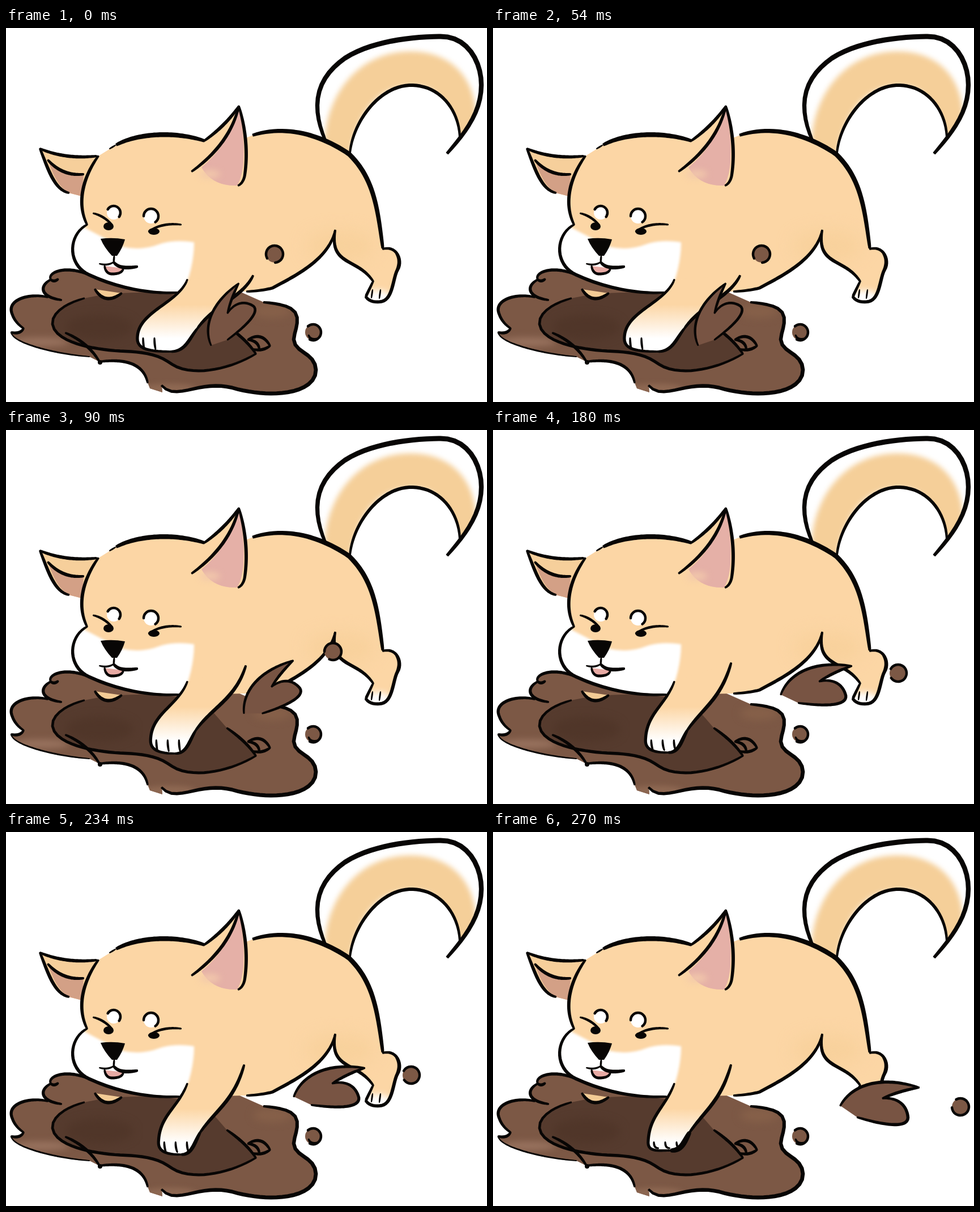
Write an HTML page that moves like this. It is 849 px wide and 660 px high and loops after 0.36 s.

```html
<!DOCTYPE html>
<html lang="en">
<head>
<meta charset="utf-8">
<title>Digging puppy</title>
<style>
  html, body { margin: 0; width: 100%; height: 100%; overflow: hidden; background: #fff; }
  svg { display: block; width: 100%; height: 100%; }
</style>
</head>
<body>
<svg id="stage" viewBox="0 0 849 660">
  <defs>
    <linearGradient id="legFur" gradientUnits="userSpaceOnUse" x1="0" y1="488" x2="0" y2="548">
      <stop offset="0" stop-color="#fcd6a5"/><stop offset="1" stop-color="#fff"/>
    </linearGradient>
  </defs>
</svg>
<script>
const NS = 'http://www.w3.org/2000/svg';
const stage = document.getElementById('stage');
const INK = '#080605', FUR = '#fcd6a5', MUD = '#7c5845', HOLE = '#563b2e';
const FRAME = 90;

function add(parent, tag, attrs = {}) {
  const el = document.createElementNS(NS, tag);
  for (const key in attrs) el.setAttribute(key, attrs[key]);
  return parent.appendChild(el);
}
const soft = blur => blur ? `filter:blur(${blur}px)` : '';
const fill = (g, d, color, blur) => add(g, 'path', { d, fill: color, style: soft(blur) });
const spot = (g, cx, cy, rx, ry, color, blur) =>
  add(g, 'ellipse', { cx, cy, rx, ry, fill: color, style: soft(blur) });
const outline = (...parts) => parts.join(' ').replace(/(?!^)M/g, 'L') + 'Z';

// A brush stroke along a path, full in the middle and thinner towards both ends.
function brush(g, d, width = 6, color = INK, blur = 0) {
  const path = document.createElementNS(NS, 'path');
  path.setAttribute('d', d);
  const length = path.getTotalLength(), steps = 48;
  const left = [], right = [];
  for (let i = 0; i <= steps; i++) {
    const at = length * i / steps;
    const p = path.getPointAtLength(at);
    const a = path.getPointAtLength(at - 1), b = path.getPointAtLength(at + 1);
    const span = Math.hypot(b.x - a.x, b.y - a.y) || 1;
    const swell = 0.6 + 0.4 * Math.sqrt(Math.max(0, Math.sin(Math.PI * i / steps)));
    const half = Math.max(0, width * swell / 2 - 1) / span;
    const nx = (a.y - b.y) * half, ny = (b.x - a.x) * half;
    left.push(`${p.x + nx},${p.y + ny}`);
    right.unshift(`${p.x - nx},${p.y - ny}`);
  }
  add(g, 'polygon', { points: [...left, ...right].join(' '), fill: color, stroke: color,
                      'stroke-width': 2, 'stroke-linejoin': 'round', style: soft(blur) });
}
const inkAll = (g, width, ...paths) => paths.forEach(d => brush(g, d, width));

// A filled disc with an open ring: the ring starts at an angle and covers a share of the turn.
function disc(g, x, y, r, color, start, share) {
  spot(g, x, y, r, r, color);
  add(g, 'circle', { r, fill: 'none', stroke: INK, 'stroke-width': 4.5, 'stroke-linecap': 'round',
                     pathLength: 100, 'stroke-dasharray': `${share} ${100 - share}`,
                     transform: `translate(${x} ${y}) rotate(${start})` });
}

function clipGroup(id, d) {
  add(add(stage, 'clipPath', { id }), 'path', { d });
  return add(stage, 'g', { 'clip-path': `url(#${id})` });
}

function drawPuddle() {
  const top = 'M146 436 C110 418 72 430 79 444';
  const lobe = 'M79 444 C58 455 60 475 98 480';
  const side = 'M74 475 C40 467 0 480 11 505 Q16 520 31 530';
  const tip = 'M31 530 Q25 541 9 537';
  const base = 'M9 538 Q14 552 60 565 Q100 576 147 580';
  const dent = 'M165 589 C210 583 243 592 250 626';
  const rim = 'M275 631 C300 660 340 620 400 635 C470 655 545 645 547 605 C547 570 505 575 508 545 C520 505 520 490 455 484';
  const hole = 'M138 477 C55 500 55 560 200 570 C310 573 270 605 345 605 Q395 602 441 575';
  const notch = 'M441 575 Q425 550 390 526';
  const shape = outline(top, lobe, side, tip, base, dent, 'M254 636 L276 643', rim, 'M410 464 L300 450');
  fill(stage, shape, MUD);
  const g = clipGroup('mud', shape);
  spot(g, 62, 554, 50, 8, '#98725e', 6);
  spot(g, 290, 636, 45, 8, '#8f6953', 5);
  spot(g, 470, 500, 34, 12, '#866049', 7);
  fill(stage, outline(hole, notch, 'M350 480 Q240 455 138 477'), HOLE);
  spot(stage, 165, 528, 60, 22, '#503629', 8);

  inkAll(stage, 5.5, top, 'M79 444 Q85 449 92 443', lobe, side, tip, hole, notch,
    'M105 538 Q145 555 165 589', dent,
    'M427 550 Q452 535 466 561', 'M466 561 Q452 571 437 567', 'M447 566 Q445 552 427 550');
  brush(stage, base, 3);
  brush(stage, rim, 7);
  spot(stage, 166, 590, 4, 4, INK);
  disc(stage, 542, 537, 14, MUD, -130, 68);
  brush(stage, 'M550 548 Q538 552 534 542', 4.5);
}

function drawTail() {
  const outer = 'M563 197 C535 130 552 85 600 52 C645 24 715 15 768 15 C815 15 839 60 839 100 C839 145 815 180 779 221';
  const inner = 'M801 195 C801 150 770 101 715 101 C660 101 612 165 607 221';
  const edge = outer.replace('779 221', '801 195');
  fill(stage, outline(edge, inner), '#fff');
  const g = clipGroup('tail', outline(edge, inner));
  brush(g, 'M585 240 C582 150 630 72 715 72 C775 72 812 110 804 200', 62, '#f5cf99', 5);
  brush(stage, outer, 9);
  brush(stage, inner, 6);
}

function drawBody() {
  const pad = 'M157 461 Q175 490 204 468';
  fill(stage, pad, '#f3cb95');
  brush(stage, pad);

  const earTop = 'M60 213 Q105 232 160 226', earSide = 'M111 291 C85 285 75 250 60 213';
  const fold = 'M74 233 Q100 262 137 258';
  fill(stage, outline(earTop, 'M134 297', earSide), '#f6cf9b');
  fill(stage, outline(fold, 'M134 297 L111 291 Q88 278 74 233'), '#d3a086');

  const cheek = 'M163 226 C145 250 120 300 143 347';
  const jaw = 'M143 347 C109 365 107 420 150 437 C190 455 245 470 306 467';
  const belly = 'M425 465 Q450 464 470 459 C505 440 570 410 581 357';
  const shank = 'M581 357 C570 420 620 405 648 447';
  const foot = 'M648 447 L635 474 Q642 485 660 483 C684 482 682 440 692 425 C700 410 690 383 665 390';
  const back = 'M665 388 C656 320 650 265 605 222 C550 185 490 172 436 189';
  const earBack = 'M410 278 Q418 274 421 262 C427 225 424 180 411 138';
  const earFront = 'M411 138 Q388 172 350 199';
  const crown = 'M350 199 C295 181 230 187 195 206';
  const body = outline(cheek, jaw, belly, shank, foot, back, 'M421 195 L411 138', earFront, crown);
  fill(stage, body, FUR);
  const g = clipGroup('body', body);
  spot(g, 590, 385, 60, 28, '#f8d19c', 14);
  fill(g, 'M125 345 Q175 372 205 386 Q240 394 275 380 Q300 373 332 378 Q332 425 309 475 L100 475 Z', '#fff', 2);
  spot(g, 655, 476, 25, 13, '#fff', 6);
  fill(stage, 'M411 138 Q395 205 345 246 Q365 280 408 278 Q430 240 411 138', '#e5b0a7');
  spot(stage, 360, 258, 18, 7, '#f2c8ab', 6);

  inkAll(stage, 6, earTop, earSide, fold, 'M411 138 Q395 205 328 253', earBack, earFront,
    cheek, jaw, belly, shank, foot);
  inkAll(stage, 8.5, crown, back);
  brush(stage, 'M689 398 Q699 412 688 432', 6);
  inkAll(stage, 3, 'M183 213 L193 207', 'M647 462 L645 476', 'M661 462 L659 477');
}

function drawFace() {
  disc(stage, 190, 326, 12, '#fff', 210, 52);
  disc(stage, 256, 332, 13, '#fff', 180, 65);
  spot(stage, 181, 350, 9, 7, INK);
  spot(stage, 261, 359, 10, 6, INK);
  inkAll(stage, 4.5, 'M154 327 Q172 331 187 347', 'M309 347 Q275 343 252 359');
  fill(stage, 'M167 372 Q188 369 210 373 Q206 388 196 402 L187 402 Q173 387 167 372', INK);
  const tongue = 'M174 420 Q176 435 190 434 Q206 433 207 424';
  fill(stage, tongue, '#e8aaa4');
  brush(stage, tongue, 5);
  inkAll(stage, 3.5, 'M191 402 L190 414', 'M165 416 Q180 420 190 413');
  brush(stage, 'M190 413 Q200 427 232 421', 6.5);
}

// The paw scrapes back fast, then settles and curls; t runs from 0 to 1.
function drawLeg(g, t) {
  const reach = (1 - t) ** 2, curl = t ** 4;
  const paw = 274 - 42 * reach, wide = 73 + 33 * reach ** 2;
  const heel = paw + wide, sole = paw + 0.55 * wide, floor = 571 - 9 * curl;
  const elbowX = 420 + 16 * reach ** 2, elbowY = 411 + 26 * reach ** 2;
  const front = `M320 444 C305 485 ${paw + 2} 500 ${paw} 545 C${paw - 2} 565 ${paw + 15} ${floor} ${sole} ${floor}`;
  const under = `M${sole} ${floor} C${paw + 0.8 * wide} ${floor} ${paw + 0.85 * wide} 550 ${heel} 530`;
  const rear = `M${heel} 530 C${heel + 28} 490 ${elbowX - 18} 475 ${elbowX} ${elbowY}`;
  fill(g, outline(front, under, rear), 'url(#legFur)');
  brush(g, front, 5.5);
  brush(g, under, 6 + 4 * curl);
  brush(g, rear, 6.5);
  for (let toe = 0; toe < 2 + curl; toe++) {
    const x = paw + 10 + 20 * toe;
    brush(g, `M${x} 547 Q${x} 558 ${x + 2 + 6 * curl} ${floor - 4}`, 4);
  }
}

function drawSplash(g, x, y, angle, scale) {
  const m = add(g, 'g', { transform: `translate(${x} ${y}) rotate(${angle}) scale(${scale})` });
  const blade = 'M0 0 C25 -28 75 -38 139 0', fold = 'M139 0 Q105 -2 74 4';
  const lobe = 'M74 4 C100 8 112 25 109 46 C105 62 75 55 24 26';
  fill(m, outline(blade, fold, lobe), '#785443');
  inkAll(m, 5.5, blade, fold, lobe);
}

drawPuddle();
drawTail();
drawBody();
drawFace();

// Where the thrown mud is at each step.
const thrown = [
  { root: [362, 560], angle: -66, pebble: [474, 399] },
  { root: [420, 500], angle: -47, pebble: [577, 391] },
  { root: [508, 467], angle: -22, pebble: [715, 429] },
  { root: [613, 483], angle: -13, pebble: [825, 485] }
];
thrown.forEach(({ root, angle, pebble }, i) => {
  const g = add(stage, 'g');
  drawLeg(g, i / (thrown.length - 1));
  drawSplash(g, ...root, angle, 0.86 + 0.055 * i);
  disc(g, ...pebble, 15, MUD, 150 + 30 * i, 82);

  const count = thrown.length;
  const steps = Array.from({ length: count + 1 }, (_, k) =>
    ({ opacity: k % count === i ? 1 : 0, offset: k / count, easing: 'step-end' }));
  g.animate(steps, { duration: count * FRAME, iterations: Infinity });
});
</script>
</body>
</html>
```
